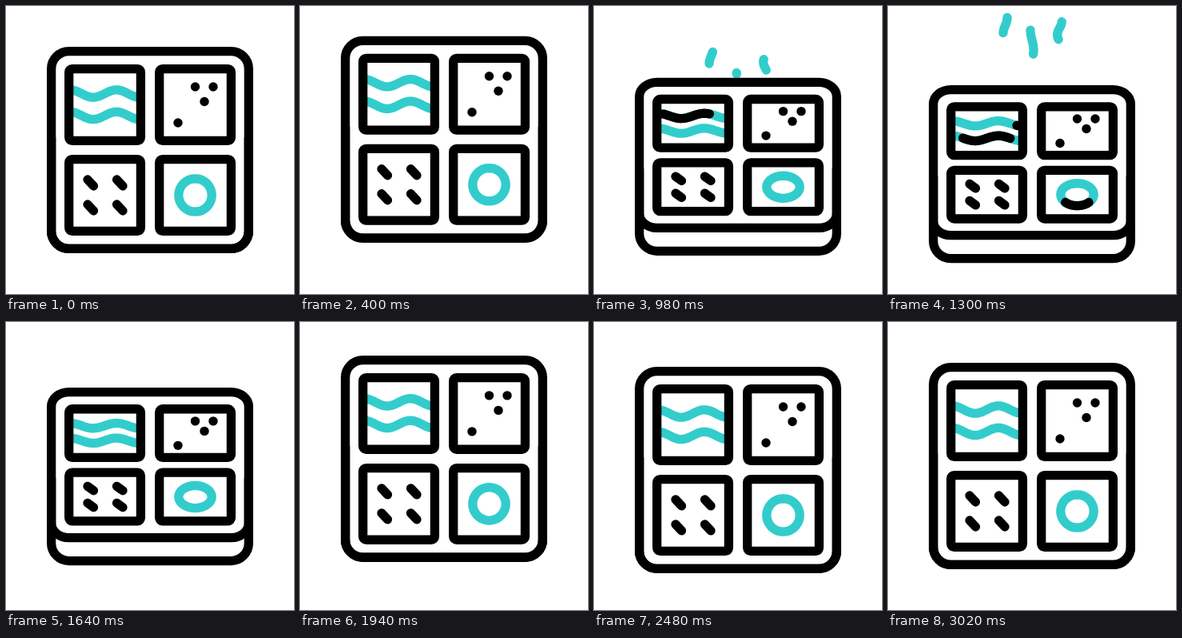
Animation of 360x360 px, one loop 3600 ms. Source, as an HTML page:

```html
<!DOCTYPE html>
<html lang="en">
<head>
<meta charset="utf-8">
<title>Food tray</title>
<style>
  html, body { margin: 0; width: 100%; height: 100%; overflow: hidden; background: #fff; }
  svg { display: block; width: 100%; height: 100%; }
  path, rect { fill: none; stroke: #000; stroke-width: 11.3; stroke-linecap: round; stroke-linejoin: round; }
  .food { stroke: #33cccc; }
</style>
</head>
<body>
<svg viewBox="0 0 360 360">
  <g id="steam"></g>
  <path id="base"/>
  <rect id="tray" x="56.65" width="246.7" rx="22"/>
  <g id="filling"></g>
  <g id="cells"></g>
</svg>
<script>
const LOOP = 3600;
const $ = id => document.getElementById(id);
const clamp = v => Math.min(1, Math.max(0, v));
const smooth = v => (v = clamp(v)) * v * (3 - 2 * v);

function add(parent, tag, attrs) {
  const el = document.createElementNS('http://www.w3.org/2000/svg', tag);
  set(el, attrs);
  return $(parent).appendChild(el);
}
function set(el, attrs) {
  for (const name in attrs) el.setAttribute(name, attrs[name]);
}

// Top edge of the tray: [time, y]
const TOP = [[0, 51], [220, 51], [450, 36], [700, 63], [920, 87], [1300, 99], [1360, 101],
  [1640, 82], [1940, 42], [1985, 37], [2240, 66], [2370, 62], [2480, 56], [2700, 52], [3020, 51], [3600, 51]];

// Monotone cubic through the keys
function slope(keys, i) {
  if (i === 0 || i === keys.length - 1) return 0;
  const [a, b, c] = keys.slice(i - 1, i + 2);
  const m = (b[1] - a[1]) / (b[0] - a[0]), n = (c[1] - b[1]) / (c[0] - b[0]);
  return m * n <= 0 ? 0 : 2 * m * n / (m + n);
}
function spline(keys, t) {
  let i = 0;
  while (i < keys.length - 2 && t > keys[i + 1][0]) i++;
  const [t0, y0] = keys[i], [t1, y1] = keys[i + 1];
  const h = t1 - t0, u = (t - t0) / h, v = 1 - u;
  return y0 + (y1 - y0) * smooth(u) + h * u * v * (slope(keys, i) * v - slope(keys, i + 1) * u);
}

// Path through the part of a curve between two fractions
function trace(curve, from = 0, to = 1) {
  if (to <= from) return '';
  let d = '';
  for (let i = 0; i <= 40; i++) {
    const [x, y] = curve(from + (to - from) * i / 40);
    d += (i ? 'L' : 'M') + x.toFixed(2) + ' ' + y.toFixed(2);
  }
  return d;
}
const sweep = (curve, t, { start, time, lag }) =>
  trace(curve, clamp((t - start - lag) / time), clamp((t - start) / time));

const stroke = (parent, cls = '') => add(parent, 'path', { class: cls });

function wave(dy) {
  return (u, cy, k) => {
    const x = 83 + 81 * u;
    return [x, cy + k * (dy + 4.7 * Math.sin(2 * Math.PI * (x - 94.5) / 58))];
  };
}
function ring(u, cy, k) {
  const a = 2 * Math.PI * u;
  return [236.5 + 20.7 * Math.sin(a), cy - k * 20.7 * Math.cos(a)];
}

const foods = [
  { row: 0, curve: wave(-14), start: 716, time: 350, lag: 248 },
  { row: 0, curve: wave(13.5), start: 999, time: 350, lag: 256 },
  { row: 1, curve: ring, start: 988, time: 500, lag: 125 }
].map(f => ({ ...f, fill: stroke('filling', 'food'), char: stroke('filling') }));

const dots = [[236.5, -22.5], [259, -22.5], [248, -4], [215, 22.5]].map(([x, dy]) =>
  ({ dy, el: add('filling', 'circle', { cx: x, r: 5.7 }) }));

const dashes = [[102, -19.5], [138.5, -19.5], [102, 11.5], [138.5, 11.5]].map(([x, dy]) =>
  ({ x, dy, el: stroke('filling') }));

const cells = [0, 1, 2, 3].map(i =>
  add('cells', 'rect', { x: i % 2 ? 191.7 : 78.7, width: 89.7, rx: 4 }));

const puffs = [
  { x: 146.5, swing: 2.5, peak: 15, half: 19, low: 72, high: 11.5, start: 872, time: 450, lag: 144 },
  { x: 180, swing: -2, peak: 30, half: 25, low: 85, high: 10, start: 972, time: 450, lag: 180 },
  { x: 214.5, swing: 2.8, peak: 19, half: 17, low: 80, high: 14, start: 890, time: 450, lag: 150 }
].map(p => ({ ...p, el: stroke('steam', 'food') }));

function draw(t) {
  const top = spline(TOP, t);
  const tilt = smooth((t - 610) / 300) - smooth((t - 1640) / 300);
  const size = 89.7 - 29 * tilt, k = size / 89.7;
  const first = top + 72.5 - 15.3 * tilt;
  const rows = [first, first + 113 - 33.6 * tilt];
  const height = 246.7 - 64.7 * tilt;
  const depth = 29 * Math.max(0, (tilt - 0.2) / 0.8);
  const bottom = top + 5.65 + height + depth;
  const side = top + 114;

  set($('tray'), { y: top + 5.65, height, ry: 22 - 4 * tilt });
  set($('base'), {
    d: `M56.65 ${side}V${bottom - 22}a22 22 0 0 0 22 22H281.35a22 22 0 0 0 22 -22V${side}`
  });
  cells.forEach((el, i) => set(el, { y: rows[i >> 1] - size / 2, height: size }));

  for (const f of foods) {
    const curve = u => f.curve(u, rows[f.row], k);
    set(f.fill, { d: trace(curve) });
    set(f.char, { d: sweep(curve, t, f) });
  }
  for (const { el, dy } of dots) set(el, { cy: rows[0] + k * dy });
  for (const { el, x, dy } of dashes) set(el, { d: `M${x} ${rows[1] + k * dy}l7.5 ${8 * k}` });
  for (const p of puffs) {
    const curve = u => {
      const y = p.low + (p.high - p.low) * u;
      return [p.x + p.swing * Math.cos(Math.PI * (y - p.peak) / p.half), y];
    };
    set(p.el, { d: sweep(curve, t, p) });
  }
}

function tick() {
  draw(performance.now() % LOOP);
  requestAnimationFrame(tick);
}
tick();
</script>
</body>
</html>
```
